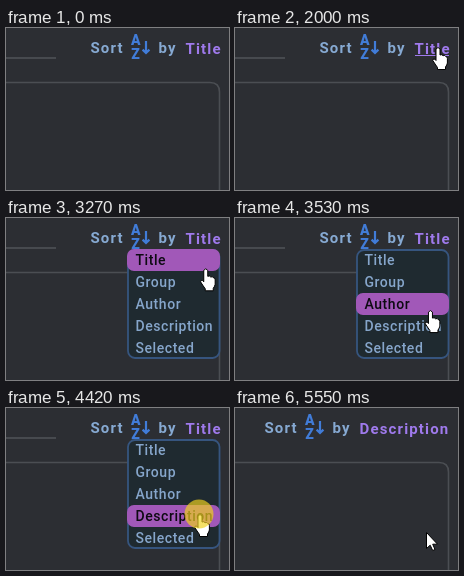
Animation, 223 px wide and 162 px high, one loop 7.43 s. Source, as an HTML page:

```html
<!DOCTYPE html>
<html lang="en">
<head>
<meta charset="utf-8">
<title>Sort menu</title>
<style>
  html, body { margin: 0; width: 100%; height: 100%; overflow: hidden; background: #2c2e33; }
  svg { display: block; width: 100%; height: 100%; }
  text { font-family: Roboto, sans-serif; }
  .head text { font-size: 15px; font-weight: 600; letter-spacing: 1.15px; fill: #86a9d2; }
  .head .value { fill: #9f7aec; }
  .head .letter { font-size: 14px; font-weight: 800; letter-spacing: 0; fill: #417cd8; }
  .menu text { font-size: 14px; font-weight: 500; letter-spacing: .55px; fill: #86a6cb; }
  .menu text.on { fill: #0d0a12; }
  .cursor path { fill: #fff; stroke: #000; stroke-linejoin: round; }
</style>
</head>
<body>
<svg viewBox="0 0 223 162">
  <path d="M-2 54.5H204Q213.5 54.5 213.5 64V170" fill="none" stroke="#4b4e53" stroke-width="1.6"/>
  <g class="head" id="head">
    <path d="M-2 30H50" stroke="#505358" stroke-width="1.4"/>
    <text x="84.5" y="25">Sort</text>
    <text class="letter" x="125" y="17">A</text>
    <text class="letter" x="125.3" y="31">Z</text>
    <path d="M140 13V25M136.6 21.6L140 25L143.4 21.6" fill="none" stroke="#417cd8" stroke-width="2.2"/>
    <text x="152.5" y="25">by</text>
    <text class="value" id="value" x="179.5" y="26"></text>
  </g>
  <path id="underline" d="M180 27.5H214" stroke="#9f7aec"/>
  <g class="menu" id="menu">
    <rect x="122" y="32" width="91.5" height="108" rx="7" fill="#1f2a30" stroke="#36557f" stroke-width="1.8"/>
    <rect id="highlight" x="121" width="93" height="22" rx="7" fill="#a158b8"/>
  </g>
  <g class="cursor" id="cursor">
    <path id="arrow" d="M.5 .5V16.5L4.2 13.2L6.7 18.5L9 17.5L6.7 12.2H11.5Z"/>
    <path id="hand" d="M-1 2Q1 -1 3 2V8Q5 7 6 8.7Q8 7.8 8.8 9.6Q10.4 9.4 10.4 11.5V16Q10 18 8.5 20V22.5H.5V20.5Q-2 17 -4.2 13.5Q-4 11.3 -2.2 12.2L-1 13.5Z"/>
    <circle id="click" r="14.5" fill="#f0d21e" fill-opacity=".68"/>
  </g>
</svg>
<script>
const LOOP = 7430, STEP = 126.5, LEAD = 27;
const ROW = 22, MENU_TOP = 31;
const $ = id => document.getElementById(id);
const show = (id, on) => $(id).setAttribute('visibility', on ? 'visible' : 'hidden');

const ramp = (n, from, to) => Math.min(1, Math.max(0, (n - from) / (to - from)));
const easeOut = p => 1 - (1 - p) ** 2;
const smooth = p => p * p * (3 - 2 * p);
const within = (n, from, to) => n >= from && n < to;

// All times below count steps, since the picture advances about 8 times a second.
const entry = { x: -9, y: 254 };
const moves = [
  { from: 8, to: 11, x: 164, y: 83 },
  { from: 12, to: 16, x: 202, y: 19 },
  { from: 25, to: 30, x: 193, y: 106 },
  { from: 41, to: 44, x: 191, y: 124 }
];
const openClick = 20, pickClick = 35;

function cursorAt(step) {
  return moves.reduce((pos, move) => {
    const p = easeOut(ramp(step, move.from, move.to));
    return { x: pos.x + (move.x - pos.x) * p, y: pos.y + (move.y - pos.y) * p };
  }, entry);
}

const items = ['Title', 'Group', 'Author', 'Description', 'Selected'].map((name, i) => {
  const item = document.createElementNS('http://www.w3.org/2000/svg', 'text');
  item.setAttribute('x', 129.5);
  item.setAttribute('y', 47 + i * ROW);
  item.textContent = name;
  return $('menu').appendChild(item);
});

function render(t) {
  const step = Math.floor((t + LEAD) / STEP);
  const { x, y } = cursorAt(step);
  const sorted = step > pickClick;

  $('value').textContent = sorted ? 'Description' : 'Title';
  $('head').setAttribute('transform', `translate(${sorted ? -55 : 0} 0)`);
  show('underline', within(step, 15, 26));

  const opacity = smooth(ramp(step, openClick + .2, openClick + 3))
    - smooth(ramp(step, pickClick, pickClick + 3));
  $('menu').setAttribute('opacity', opacity);
  $('menu').setAttribute('transform',
    `translate(167.5 30) scale(${.9 + .1 * opacity}) translate(-167.5 -30)`);

  const row = Math.floor((y - MENU_TOP) / ROW);
  items.forEach((item, i) => item.classList.toggle('on', i === row));
  $('highlight').setAttribute('y', MENU_TOP + row * ROW);
  $('highlight').setAttribute('opacity', row < 0 ? 0 : 1);

  const pointing = within(step, 15, pickClick + 2);
  show('arrow', !pointing);
  show('hand', pointing);
  show('click', step === openClick || step === pickClick);
  $('cursor').setAttribute('transform', `translate(${x} ${y})`);
}

const begin = performance.now();
function tick() {
  render((performance.now() - begin) % LOOP);
  requestAnimationFrame(tick);
}
tick();
</script>
</body>
</html>
```
